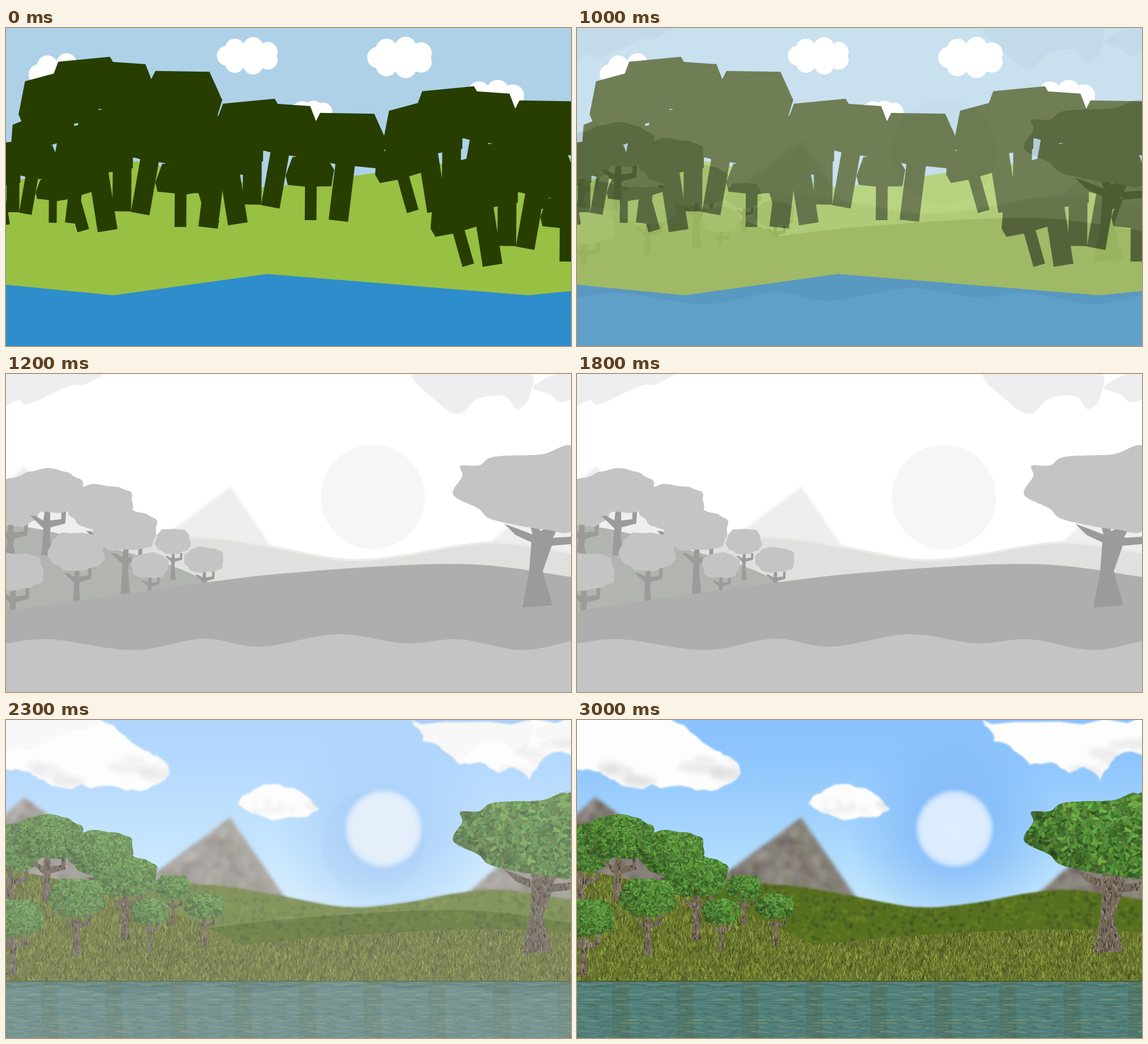
These frames come from a looping animation (998 px wide and 561 px high, 3.4 s). An HTML page with a canvas:

```html
<!DOCTYPE html>
<html lang="en">
<head>
<meta charset="utf-8">
<title>Landscape in three stages</title>
<style>
  html, body { margin: 0; width: 100%; height: 100%; overflow: hidden; }
  canvas { display: block; width: 998px; height: 561px; }
</style>
</head>
<body>
<canvas id="stage" width="998" height="561"></canvas>
<script>
const W = 998, H = 561, PAD = 12, TAU = 2 * Math.PI;

let seed = 7;
function rand(a = 0, b = 1) {
  seed = (seed + 0x6D2B79F5) | 0;
  let t = Math.imul(seed ^ (seed >>> 15), 1 | seed);
  t = (t + Math.imul(t ^ (t >>> 7), 61 | t)) ^ t;
  return a + (b - a) * (((t ^ (t >>> 14)) >>> 0) / 4294967296);
}

// Calls draw(x, y, i) at n random places in a box x, y, width, height.
function scatter(n, [x, y, w, h], draw) {
  for (let i = 0; i < n; i++) draw(x + rand() * w, y + rand() * h, i);
}

// ---- paths: points are flat lists x, y, x, y ...
function poly(p) {
  const path = new Path2D();
  for (let i = 0; i < p.length; i += 2) path.lineTo(p[i], p[i + 1]);
  path.closePath();
  return path;
}

// Smooth curve through every point; an open one is closed down to the bottom.
function curve(p, open) {
  const n = p.length / 2, path = new Path2D();
  const at = i => {
    const k = open ? Math.max(0, Math.min(n - 1, i)) : (i + n) % n;
    return [p[2 * k], p[2 * k + 1]];
  };
  path.moveTo(p[0], p[1]);
  for (let i = 0; i < (open ? n - 1 : n); i++) {
    const [a, b, c, d] = [at(i - 1), at(i), at(i + 1), at(i + 2)];
    path.bezierCurveTo(b[0] + (c[0] - a[0]) / 6, b[1] + (c[1] - a[1]) / 6,
      c[0] - (d[0] - b[0]) / 6, c[1] - (d[1] - b[1]) / 6, c[0], c[1]);
  }
  if (open) {
    path.lineTo(p[p.length - 2], H);
    path.lineTo(p[0], H);
  }
  path.closePath();
  return path;
}

const slope = (...p) => curve(p, true);

// Splits every side and shifts its middle at random, for a ragged outline.
function roughen(p, rounds) {
  if (!rounds) return p;
  const out = [];
  for (let i = 0; i < p.length; i += 2) {
    const [x, y] = [p[i], p[i + 1]];
    const [dx, dy] = [p[(i + 2) % p.length] - x, p[(i + 3) % p.length] - y];
    const k = rand(-.06, .18);
    out.push(x, y, x + dx / 2 + dy * k, y + dy / 2 - dx * k);
  }
  return roughen(out, rounds - 1);
}

// ---- drawing helpers
function sheet(w, h) {
  const c = document.createElement('canvas');
  c.width = w;
  c.height = h;
  return c.getContext('2d');
}

function fill(g, path, color) {
  g.fillStyle = color;
  g.fill(path);
}

function rect(g, x, y, w, h, color) {
  g.fillStyle = color;
  g.fillRect(x, y, w, h);
}

function ellipse(g, x, y, rx, ry, angle, color) {
  g.fillStyle = color;
  g.beginPath();
  g.ellipse(x, y, rx, ry, angle, 0, TAU);
  g.fill();
}

function line(g, x1, y1, x2, y2, width, color) {
  g.strokeStyle = color;
  g.lineWidth = width;
  g.beginPath();
  g.moveTo(x1, y1);
  g.lineTo(x2, y2);
  g.stroke();
}

function within(g, path, draw) {
  g.save();
  g.clip(path);
  draw();
  g.restore();
}

function blurred(g, radius, draw) {
  const layer = sheet(W + 2 * PAD, H + 2 * PAD);
  layer.translate(PAD, PAD);
  draw(layer);
  g.filter = `blur(${radius}px)`;
  g.drawImage(layer.canvas, -PAD, -PAD);
  g.filter = 'none';
}

function stops(gradient, list) {
  for (const [at, color] of list) gradient.addColorStop(at, color);
  return gradient;
}

// ---- stage 1: flat shapes
const DARK = '#273e00';

function puffyCloud(g, x, y, rx, ry, r) {
  ellipse(g, x, y, rx, ry, 0, '#fff');
  for (let a = 0; a < 7; a++) {
    const t = TAU * (a / 7 + .5);
    ellipse(g, x + rx * Math.cos(t), y + ry * Math.sin(t), r, r, 0, '#fff');
  }
}

// One leaning tree standing on x, y.
function flatTree(g, x, y, scale, degrees) {
  g.save();
  g.translate(x, y);
  g.rotate(degrees * TAU / 360);
  g.scale(scale, scale);
  fill(g, poly([-45, -78, -33, -111, 24, -117, 41, -89, 36, -60, -9, -59, -41, -62]), DARK);
  line(g, 0, -66, 0, 0, 20.7, DARK);
  g.restore();
}

function clump(g, dx, dy, scale = 1) {
  g.save();
  g.translate(dx, dy);
  g.scale(scale, scale);
  flatTree(g, 136.5, 357.5, 1.03, -15.8);
  flatTree(g, 179.5, 357.5, 1.7, -9);
  flatTree(g, 204.5, 323.5, 1.6, .5);
  flatTree(g, 237, 327.5, 1.6, 10);
  flatTree(g, 308, 351, 1, .5);
  flatTree(g, 357, 352, 1.667, 7);
  g.restore();
}

function paintFlat(g) {
  rect(g, 0, 0, W, H, '#aed1e8');
  puffyCloud(g, 98, 82, 40, 20, 18);
  puffyCloud(g, 428, 49, 38, 16, 17.5);
  puffyCloud(g, 697, 52, 40, 18, 19);
  puffyCloud(g, 538, 151, 24, 6, 17);
  puffyCloud(g, 860, 126, 39, 15, 20);
  fill(g, poly([0, 271, 230, 235, 460, 282, 860, 227, W, 230, W, H, 0, H]), '#98c043');
  clump(g, -61, -86);
  clump(g, 0, 0);
  clump(g, 230, -12);
  clump(g, 582, -34);
  clump(g, 680, 61);
  clump(g, -127, 105, .68);
  fill(g, poly([0, 453, 190, 471.5, 461, 434, 923, 471.5, W, 464, W, H, 0, H]), '#2e8dcb');
}

// ---- shapes shared by the grey and the painted stage
const mountain = (x, y, left, right) => poly([x, y, right, 332, left, 332]);
const mountains = [mountain(32, 136, -180, 300), mountain(396, 172, 179, 506), mountain(940, 195, 785, 1110)];
const farHill = slope(150, 280, 330, 289, 400, 295, 480, 309, 600, 330, 700, 323, 800, 305, 880, 300, 1010, 319);
const leftHill = slope(-5, 265, 70, 276, 185, 307, 300, 341, 425, 400);

// A lumpy, slightly boxy oval.
function crown(x, y, rx, ry) {
  const p = [], round = v => Math.sign(v) * Math.abs(v) ** .8;
  for (let a = 0; a < TAU - .01; a += TAU / 40) {
    const r = .96 + .04 * Math.sin(5 * a + x) + .025 * Math.sin(11 * a + y);
    p.push(x + rx * r * round(Math.cos(a)), y + ry * r * round(Math.sin(a)));
  }
  return curve(p);
}

function trunk(x, y, base, w) {
  const p = [-1.7, 0, -1.2, 0, -.35, .5, -.15, -1, .35, -1, .35, .5, 1.5, .35, 1.5, -.6,
    2, -.6, 1.9, .8, .4, 1.2, .3, 2].map((v, i) => v * w + (i % 2 ? y : x));
  return poly([...p, x + .55 * w, base, x - .55 * w, base, x - .35 * w, y + 1.3 * w]);
}

function tree(x, y, rx, ry, base) {
  const top = y + ry + 3;
  return {
    box: [x - rx, y - ry, 2 * rx, 2 * ry],
    crown: crown(x, y, rx, ry),
    trunk: trunk(x, top, base, rx * .26),
    trunkBox: [x - rx, top - 16, 2 * rx, base - top + 16]
  };
}

const grove = [
  tree(8, 226, 60, 43, 320),
  tree(72, 207, 66, 40, 320),
  tree(168, 234, 60, 40, 305),
  tree(295, 295, 32, 23, 363),
  tree(211, 276, 58, 37, 388),
  tree(125, 313, 51, 35, 415),
  tree(254, 338, 34, 23, 408),
  tree(350, 328, 36, 23, 398),
  tree(12, 348, 57, 34, 450)
];

const bigTree = {
  box: [788, 130, 215, 148],
  crown: curve([803, 162, 836, 161, 862, 146, 945, 142, 1004, 133, 1004, 268,
    950, 274, 860, 257, 834, 237, 790, 213, 806, 180]),
  trunk: poly([880, 264, 930, 283, 926, 268, 942, 268, 943, 277, 980, 262, 966, 289,
    W, 287, W, 300, 964, 303, 948, 348, 965, 408, 912, 412, 924, 350, 928, 297, 900, 284]),
  trunkBox: [880, 260, 118, 152]
};

// ---- stage 2: grey layout
function paintGrey(g) {
  const leaf = '#c4c4c4', bark = '#9b9b9a', pale = '#eee';
  const edged = (path, color, edge) => {
    g.strokeStyle = edge;
    g.lineWidth = 8;
    g.lineJoin = 'round';
    g.stroke(path);
    fill(g, path, color);
  };
  const plant = t => {
    fill(g, t.trunk, bark);
    fill(g, t.crown, leaf);
  };
  rect(g, 0, 0, W, H, '#fff');
  fill(g, curve([-8, -8, 166, -8, 140, 18, 112, 21, 40, 53, 23, 46, -8, 53]), pale);
  fill(g, curve([722, -8, 765, 52, 802, 70, 833, 44, 880, 39, 903, 62, 925, 38, 912, -8]), pale);
  fill(g, curve([931, 24, 966, 2, 1008, -8, 1008, 36, 980, 50, 960, 36]), pale);
  ellipse(g, 648, 217, 92, 92, 0, '#f6f6f6');
  g.save();
  g.translate(0, 30);
  for (const m of mountains) edged(m, pale, '#f7f7f7');
  g.restore();
  edged(farHill, '#e0e1de', '#ebebea');
  fill(g, leftHill, '#b1b4af');
  grove.forEach(plant);
  fill(g, slope(0, 418, 250, 382, 500, 351, 800, 335, W, 358), '#aeaeae');
  plant(bigTree);
  fill(g, slope(0, 475, 80, 468, 225, 487, 348, 467, 450, 481, 585, 459, 705, 475, 800, 468, 910, 487, W, 471), leaf);
}

// ---- stage 3: painted textures
function speckle(g, path, base, box, n, size, colors) {
  within(g, path, () => {
    rect(g, ...box, base);
    scatter(n, box, (x, y, i) => ellipse(g, x, y, rand(.5, 1) * size, rand(.4, 1) * size,
      rand(0, 3), colors[i % colors.length]));
  });
}

function grass(g, path, box) {
  within(g, path, () => {
    rect(g, ...box, 'hsl(70 46% 31%)');
    scatter(box[2] * box[3] / 11, box, (x, y) => line(g, x, y, x + rand(-4, 4), y - rand(4, 10), rand(.6, 1.3),
      `hsl(${rand(66, 78)} ${rand(36, 48)}% ${rand(16, 53)}%)`));
  });
}

function leafy(g, t, size) {
  within(g, t.trunk, () => {
    rect(g, ...t.trunkBox, '#75695a');
    scatter(t.trunkBox[2] * t.trunkBox[3] / 22, t.trunkBox, (x, y, i) =>
      line(g, x, y, x + rand(-2, 2), y + rand(3, 9), rand(.6, 1.8), i % 2 ? '#41382c' : '#9a9180'));
  });
  const [left, top, w, h] = t.box, n = 3.2 * w * h / size ** 2;
  within(g, t.crown, () => {
    rect(g, ...t.box, '#2f5520');
    scatter(n, t.box, (x, y, i) => {
      const u = (x - left) / w, v = (y - top) / h;
      const light = 16 + 22 * rand() + 10 * i / n + 9 * Math.min(u, .6) - 7 * v;
      ellipse(g, x, y, size, size * .42, rand(0, TAU), `hsl(${rand(90, 108)} ${rand(36, 48)}% ${light}%)`);
    });
  });
}

// A ragged cloud from a few key points, shaded in its lower part.
function softCloud(g, ...p) {
  const xs = p.filter((v, i) => i % 2 == 0), ys = p.filter((v, i) => i % 2);
  const [x, y, w, h] = [Math.min(...xs), Math.min(...ys), Math.max(...xs) - Math.min(...xs), Math.max(...ys) - Math.min(...ys)];
  blurred(g, 1.4, l => {
    const path = poly(roughen(p, 3));
    fill(l, path, '#fdfdfd');
    within(l, path, () => {
      l.filter = 'blur(4px)';
      scatter(12, [x, y + h * .45, w, h * .5], (cx, cy) =>
        ellipse(l, cx, cy, w * rand(.04, .12), h * rand(.04, .1), .1, 'rgba(215,216,217,.45)'));
    });
  });
}

function water(g) {
  const top = 461, tile = 114;
  const everyTile = draw => { for (let x = -tile; x < W; x += tile) draw(x); };
  rect(g, 0, top, W, H - top, '#517f7a');
  everyTile(x => rect(g, x + 62, top, 30, H - top, 'rgba(72,92,50,.25)'));
  scatter(210, [0, top, tile, H - top], (px, py, i) => {
    const len = rand(6, 32), dy = rand(-1.5, 1.5), w = rand(.6, 2.2);
    const color = i % 5 == 0 ? 'rgba(150,165,130,.45)' : i % 2 ? 'rgba(100,150,152,.32)' : 'rgba(52,86,68,.32)';
    everyTile(x => line(g, x + px, py, x + px + len, py + dy, w, color));
  });
  rect(g, 0, top - 1, W, 2, '#4b5c36');
}

function paintFull(g) {
  rect(g, 0, 0, W, H, stops(g.createLinearGradient(0, 0, 0, 335),
    [[0, '#89c1fe'], [.22, '#8fc6fe'], [.65, '#aad8fd'], [1, '#c6e8fc']]));
  const halo = '130,186,248';
  rect(g, 0, 0, W, 400, stops(g.createRadialGradient(667, 192, 0, 667, 192, 190),
    [[0, '#dfeefe'], [.29, '#dcecfe'], [.33, '#cbe4fe'], [.38, `rgba(${halo},.75)`],
      [.5, `rgba(${halo},.62)`], [1, `rgba(${halo},0)`]]));

  blurred(g, 3, l => {
    for (const m of mountains)
      speckle(l, m, '#87817b', [-PAD, 130, W + 2 * PAD, 202], 1100, 11,
        ['rgba(160,156,148,.42)', 'rgba(102,88,86,.42)', 'rgba(122,126,104,.42)']);
  });
  blurred(g, 1.7, l => speckle(l, farHill, '#57701f', [140, 275, W, 180], 3000, 4.5,
    ['rgba(112,134,42,.5)', 'rgba(52,76,34,.5)', 'rgba(90,112,28,.5)']));

  softCloud(g, -10, -10, 152, -10, 245, 54, 289, 95, 200, 119, 65, 105, 42, 92, -10, 84);
  softCloud(g, 409, 148, 456, 114, 490, 118, 537, 140, 553, 158, 500, 171, 425, 159);
  softCloud(g, 696, -10, 736, 38, 800, 79, 870, 94, 895, 83, 923, 108, 938, 86, 975, 56, 1010, 72, 1010, -10);

  grass(g, leftHill, [-5, 260, 435, 205]);
  grass(g, slope(-5, 432, 410, 397, 600, 380, 850, 369, 1003, 375), [-5, 365, 1010, 105]);
  for (const t of grove) leafy(g, t, 3.6);
  leafy(g, bigTree, 7);
  water(g);
}

// ---- playback
function scene(paint) {
  const g = sheet(W, H);
  paint(g);
  return g.canvas;
}

const [flat, grey, full] = [paintFlat, paintGrey, paintFull].map(scene);
const stage = document.getElementById('stage').getContext('2d');

// A fade runs in three hard steps of 100 ms.
function mix(t, start) {
  return Math.max(0, Math.min(3, Math.floor((t - start) / 100) + 1)) / 3;
}

function show(picture, alpha) {
  stage.globalAlpha = alpha;
  stage.drawImage(picture, 0, 0);
}

function frame() {
  const t = performance.now() % 3400;
  show(flat, 1);
  show(grey, mix(t, 1000));
  show(full, mix(t, 2200));
  requestAnimationFrame(frame);
}
frame();
</script>
</body>
</html>
```
